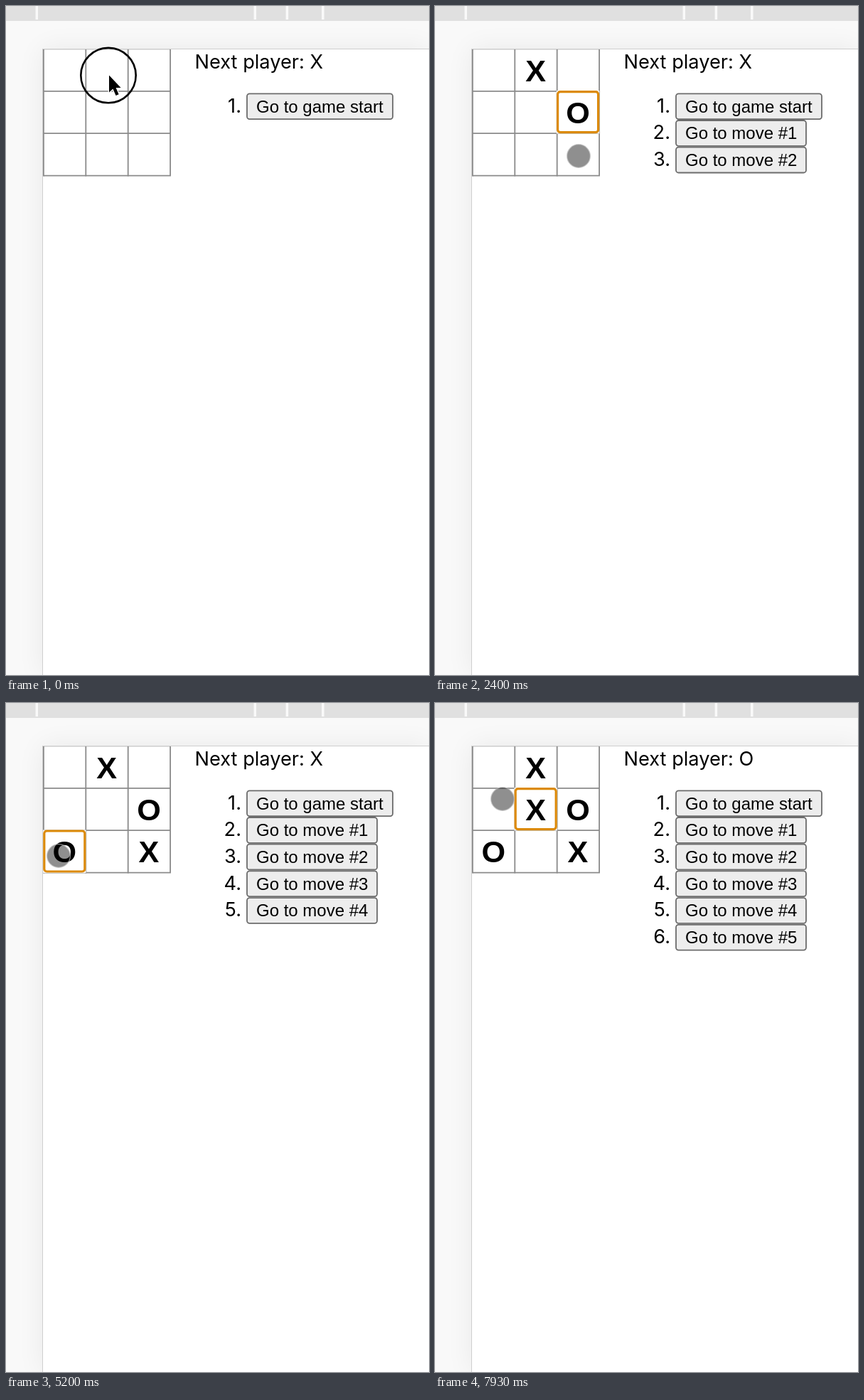
An HTML page that plays this animation: 595 by 941 pixels, repeating every 8000 ms.

```html
<!DOCTYPE html>
<html lang="en">
<head>
<meta charset="utf-8">
<title>Tic-tac-toe</title>
<style>
  html, body { margin: 0; width: 100%; height: 100%; overflow: hidden; background: #f9f9f9; }
  .stage { position: fixed; inset: 0; overflow: hidden; }
  .page { position: absolute; inset: 61px 0 0 52px; background: #fff;
          box-shadow: 0 0 0 1px #cfcfcf, 0 0 36px rgba(0, 0, 0, .07); }
  svg { position: absolute; inset: 0; width: 100%; height: 100%; }
  .label { font: 27.2px Inter, sans-serif; }
  .button { font: 24px "Liberation Sans", Arial, sans-serif; }
  .mark { font: bold 43.2px "Liberation Sans", Arial, sans-serif; text-anchor: middle; }
  .end { text-anchor: end; }
</style>
</head>
<body>
<div class="stage">
  <div class="page"></div>
  <svg>
    <clipPath id="pageClip"><rect x="52" y="61" width="543" height="880"/></clipPath>
    <path d="M0 0H595V21H0Z" fill="#e0e0e0"/>
    <path d="M43.3 0V19M350.3 0V19M395.4 0V19M445.8 0V19" stroke="#f9f9f9" stroke-width="3.5"/>
    <g clip-path="url(#pageClip)">
      <g id="grid" fill="none" stroke="#8b8b8b" stroke-width="1.8"></g>
      <g id="focus">
        <rect x="-.5" y="-.5" width="60.4" height="60.4" fill="#fff"/>
        <rect x="1.2" y="1" width="57" height="57" rx="3.5" fill="#fff" stroke="#dc8a08" stroke-width="3.2"/>
      </g>
      <g id="marks"></g>
    </g>
    <text id="status" class="label" x="265.5" y="87.7"></text>
    <g id="history"></g>
    <circle id="touch" r="16.4" fill="rgba(0,0,0,.44)" stroke="rgba(200,200,200,.65)" stroke-width="1.4"/>
    <g id="pointer">
      <circle cx="144" cy="97.6" r="38.7" fill="none" stroke="#000" stroke-width="2.6"/>
      <path d="M145 97.5V121.5L150.4 116.6 154.6 126 158.6 124.3 154.6 115H161.6Z"
            stroke="#fff" stroke-width="2.6" paint-order="stroke" stroke-linejoin="round"/>
    </g>
  </svg>
</div>
<script>
const LOOP = 8000, STEP = 1000 / 15;
const LEFT = 52.9, TOP = 60.4, PITCH = 59.4, ROW = 37.7;
const REST = 0.4; // share of the time between two stops spent waiting before the glide

// Where the finger comes to rest: arrival time and position
const stops = [
  { at: 0, x: 146, y: 100 },
  { at: 333, x: 269, y: 191 },
  { at: 1000, x: 140, y: 106 },
  { at: 1733, x: 206, y: 168 },
  { at: 2400, x: 202, y: 211 },
  { at: 3133, x: 194, y: 219 },
  { at: 3600, x: 161, y: 214 },
  { at: 4000, x: 198, y: 213 },
  { at: 4867, x: 49, y: 216 },
  { at: 5067, x: 74, y: 215 },
  { at: 6067, x: 139, y: 154 },
  { at: 6600, x: 137, y: 230 },
  { at: 7933, x: 95, y: 135 }
];
const tapTimes = [1130, 2065, 4000, 5067, 6330];

const byId = id => document.getElementById(id);
const show = (node, visible) => node.setAttribute('visibility', visible ? 'visible' : 'hidden');
const player = turn => 'XO'[turn % 2];

function add(parent, tag, attributes, text = '') {
  const node = document.createElementNS('http://www.w3.org/2000/svg', tag);
  for (const key in attributes) node.setAttribute(key, attributes[key]);
  node.textContent = text;
  return parent.appendChild(node);
}

function touchAt(time) {
  const i = stops.findIndex(stop => stop.at > time);
  if (i < 0) return stops[stops.length - 1];
  const from = stops[i - 1], to = stops[i];
  const progress = (time - from.at) / (to.at - from.at);
  const u = Math.max(0, (progress - REST) / (1 - REST));
  const eased = u * u * (3 - 2 * u);
  return { x: from.x + (to.x - from.x) * eased, y: from.y + (to.y - from.y) * eased };
}

// A tap marks the cell under the finger
const cells = tapTimes.map(time => {
  const { x, y } = touchAt(time);
  const snap = (value, origin) => origin + Math.floor((value - origin) / PITCH) * PITCH;
  return { x: snap(x, LEFT), y: snap(y, TOP) };
});

for (let i = 0; i < 4; i++) {
  const x = LEFT + i * PITCH, y = TOP + i * PITCH;
  add(byId('grid'), 'path', { d: `M${x} ${TOP}v${3 * PITCH + 0.9}M${LEFT} ${y}h${3 * PITCH + 0.9}` });
}

const marks = cells.map(({ x, y }, i) =>
  add(byId('marks'), 'text', { class: 'mark', x: x + 29.3, y: y + 45.2 }, player(i)));

const entries = [null, ...cells].map((cell, i) => {
  const entry = add(byId('history'), 'g', { transform: `translate(0 ${i * ROW})` });
  add(entry, 'text', { class: 'label end', x: 331, y: 149.5 }, `${i + 1}.`);
  add(entry, 'rect', { x: 339, y: 123.3, width: cell ? 183 : 205, height: 35.8, rx: 3.6,
    fill: '#ededed', stroke: '#6c6c6c', 'stroke-width': 1.8 });
  add(entry, 'text', { class: 'button', x: 352, y: 149.5 }, cell ? `Go to move #${i}` : 'Go to game start');
  return entry;
});

function draw(elapsed) {
  const time = Math.floor((elapsed % LOOP + 4) / STEP) * STEP % LOOP;
  const played = tapTimes.filter(tap => tap <= time).length;
  marks.forEach((mark, i) => show(mark, i < played));
  entries.forEach((entry, i) => show(entry, i <= played));
  byId('status').textContent = `Next player: ${player(played)}`;

  show(byId('focus'), played > 0);
  if (played) {
    const { x, y } = cells[played - 1];
    byId('focus').setAttribute('transform', `translate(${x - 0.3} ${y - 0.2})`);
  }

  const touching = time >= STEP / 2;
  const { x, y } = touchAt(time);
  show(byId('pointer'), !touching);
  show(byId('touch'), touching);
  byId('touch').setAttribute('transform', `translate(${x} ${y})`);
}

const start = performance.now();
function tick() {
  draw(performance.now() - start);
  requestAnimationFrame(tick);
}
tick();
</script>
</body>
</html>
```
